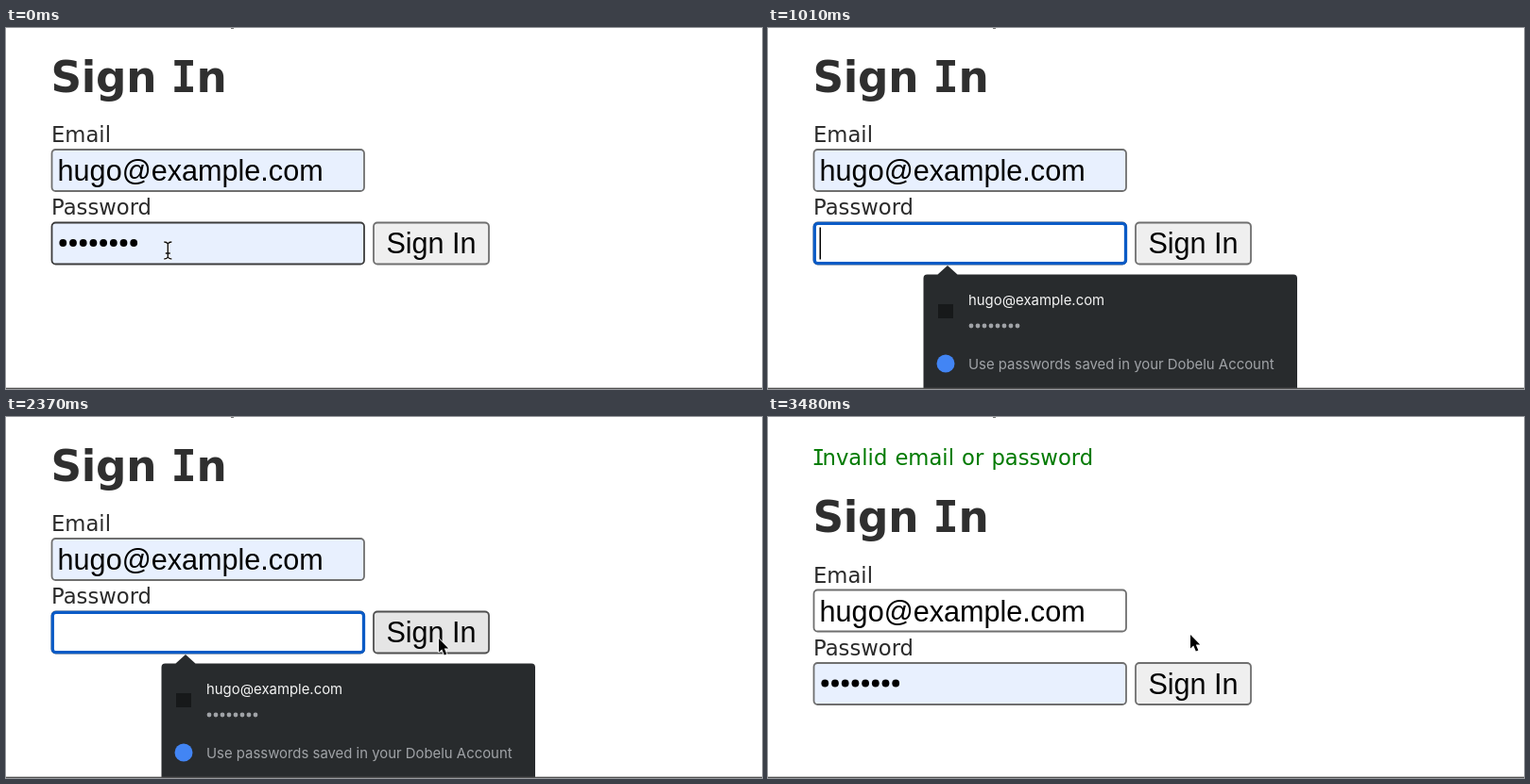
Recreate the animation shown at these times as an HTML page. Size 800 by 383 pixels, loop 3590 ms.

```html
<!DOCTYPE html>
<html lang="en">
<head>
<meta charset="utf-8">
<title>Sign In</title>
<style>
  html, body { margin: 0; width: 100%; height: 100%; overflow: hidden; background: #fff; }
  svg { display: block; width: 100%; height: 100%; }
  .label { font: 22.7px "DejaVu Sans", Verdana, sans-serif; fill: #2b2b2b; }
  .flash { fill: #007a00; word-spacing: .9px; }
  .title { font: bold 45.3px "DejaVu Sans", Verdana, sans-serif; letter-spacing: -.3px; fill: #2f2f2f; }
  .serif { font-family: "DejaVu Sans Mono", monospace; }
  .value { font: 30.6px "Liberation Sans", Arial, sans-serif; fill: #000; }
  .menu { font: 14.9px Inter, Roboto, sans-serif; }
  .box { stroke: #6f6f6f; stroke-width: 1.8; }
</style>
</head>
<body>
<svg viewBox="0 0 800 383" xmlns="http://www.w3.org/2000/svg">
  <defs>
    <path id="beamShape" d="M-4-9Q-1-9 0-7Q1-9 4-9M0-7V7M-4 9Q-1 9 0 7Q1 9 4 9M-2.5 3H2.5"/>
  </defs>
  <rect width="800" height="383" fill="#fff"/>
  <rect x="238" width="3" height="1" fill="#777"/>

  <text id="flash" class="label flash" x="46.4" y="51"><tspan class="serif">I</tspan><tspan dx="-2.5">nvalid email or password</tspan></text>

  <g id="form">
    <text class="title" x="47.5" y="67.6">Sign <tspan class="serif">I</tspan>n</text>
    <text class="label" x="48" y="121">Email</text>
    <rect id="email" class="box" x="48.5" y="129" width="330.5" height="44" rx="4"/>
    <text class="value" x="54.6" y="162">hugo@example.com</text>
    <text class="label" x="48" y="198">Password</text>
    <rect id="pass" class="box" x="48.5" y="206.5" width="330.5" height="44" rx="4"/>
    <rect id="ring" x="49.3" y="207.3" width="329.2" height="42.4" rx="3.5" fill="none" stroke="#0b5bc6" stroke-width="3.3"/>
    <rect id="selection" x="54.5" y="211" width="86" height="35" fill="#accffb"/>
    <g id="dots"></g>
    <rect id="caret" y="211.5" width="1.5" height="34"/>
    <rect id="button" class="box" x="389" y="206.5" width="122" height="44" rx="4"/>
    <text class="value" x="450" y="239" text-anchor="middle">Sign In</text>
  </g>

  <g id="menu" class="menu">
    <path d="M164.5 383V265.5q0-4 4-4H179.5L190 252 200.5 261.5H556q4 0 4 4V383Z" fill="#282b2d"/>
    <rect x="180" y="293" width="16" height="15" fill="#17191a"/>
    <text x="212" y="294" fill="#f4f4f4">hugo@example.com</text>
    <g id="menuDots" fill="#a0a3a7"></g>
    <circle cx="188" cy="356" r="9.5" fill="#4285f4"/>
    <text x="212" y="362" fill="#a0a3a7">Use passwords saved in your Dobelu Account</text>
  </g>
  <rect y="381.7" width="800" height="1.3" fill="#505050"/>

  <g id="beam" fill="none">
    <use href="#beamShape" x="-.7" stroke="#fff" stroke-width="3"/>
    <use href="#beamShape" x="-.7" stroke="#111" stroke-width="1.4"/>
  </g>
  <path id="arrow" d="M0 0V14.5L3.3 11.4 5.8 17.6 8.3 16.5 5.8 10.5H10.2Z" fill="#000" stroke="#fff" stroke-width="1.6" stroke-linejoin="round" paint-order="stroke"/>
</svg>
<script>
const LOOP = 3590;
const $ = id => document.getElementById(id);
const show = (id, on) => $(id).setAttribute('visibility', on ? 'visible' : 'hidden');
const paint = (id, fill, stroke) => {
  $(id).style.fill = fill;
  if (stroke) $(id).style.stroke = stroke;
};
const clamp = u => Math.min(1, Math.max(0, u));
const within = (t, a, b) => t >= a && t < b;

const linear = u => u;
const easeIn = u => u * u;
const easeOut = u => 1 - (1 - u) ** 2;
const smooth = u => u * u * (3 - 2 * u);

// time, x, y, easing towards this point
const path = [
  [0, 172, 236, linear],
  [190, 172, 236, linear],
  [400, 174, 235, linear],
  [1420, 174, 235, linear],
  [1570, 187, 226, easeIn],
  [1850, 304, 232, easeOut],
  [1950, 304, 232, linear],
  [2370, 458, 235, smooth]
];

function pointer(t) {
  if (t >= 3480) return [447, 231];
  const i = path.findIndex(p => p[0] > t);
  if (i < 0) return path[path.length - 1].slice(1, 3);
  const [t0, x0, y0] = path[i - 1], [t1, x1, y1, ease] = path[i];
  const u = ease((t - t0) / (t1 - t0));
  return [x0 + (x1 - x0) * u, y0 + (y1 - y0) * u];
}

function addDots(id, x, y, step, r) {
  for (let i = 0; i < 8; i++) {
    const dot = document.createElementNS('http://www.w3.org/2000/svg', 'circle');
    dot.setAttribute('cx', x + i * step);
    dot.setAttribute('cy', y);
    dot.setAttribute('r', r);
    $(id).append(dot);
  }
}

function render(t) {
  const [x, y] = pointer(t);
  const focused = within(t, 20, 2520);
  const reloaded = t >= 3040;
  const filled = t < 990 || t >= 3150;
  const pressed = within(t, 2520, 2750);
  const hover = x >= 389 && !reloaded;

  show('flash', reloaded);
  $('form').setAttribute('transform', `translate(0 ${reloaded ? 54.5 : 0})`);
  paint('email', reloaded ? '#fff' : '#e8f0fe');
  paint('pass', filled ? '#e8f0fe' : '#fff', t < 20 ? '#3c3c3c' : '#6f6f6f');
  show('ring', focused);
  show('selection', within(t, 190, 990));
  show('dots', filled);
  show('caret', within(t, 20, 190) || within(t, 990, 1600));
  $('caret').setAttribute('x', t < 190 ? 141 : 54.5);

  if (pressed) paint('button', '#f5f5f5', '#8d8d8d');
  else if (hover) paint('button', '#e5e5e5', '#4f4f4f');
  else paint('button', '#efefef', '#6f6f6f');

  show('menu', within(t, 190, 2520));
  $('menu').setAttribute('opacity', clamp((t - 170) / 180));

  const text = x < 380;
  show('beam', text && !within(t, 1010, 1420));
  show('arrow', !text);
  for (const id of ['beam', 'arrow']) $(id).setAttribute('transform', `translate(${x} ${y})`);
}

addDots('dots', 60.3, 228, 10.7, 3.9);
addDots('menuDots', 215, 316, 7, 2.4);

const start = performance.now();
function tick() {
  render((performance.now() - start) % LOOP);
  requestAnimationFrame(tick);
}
tick();
</script>
</body>
</html>
```
